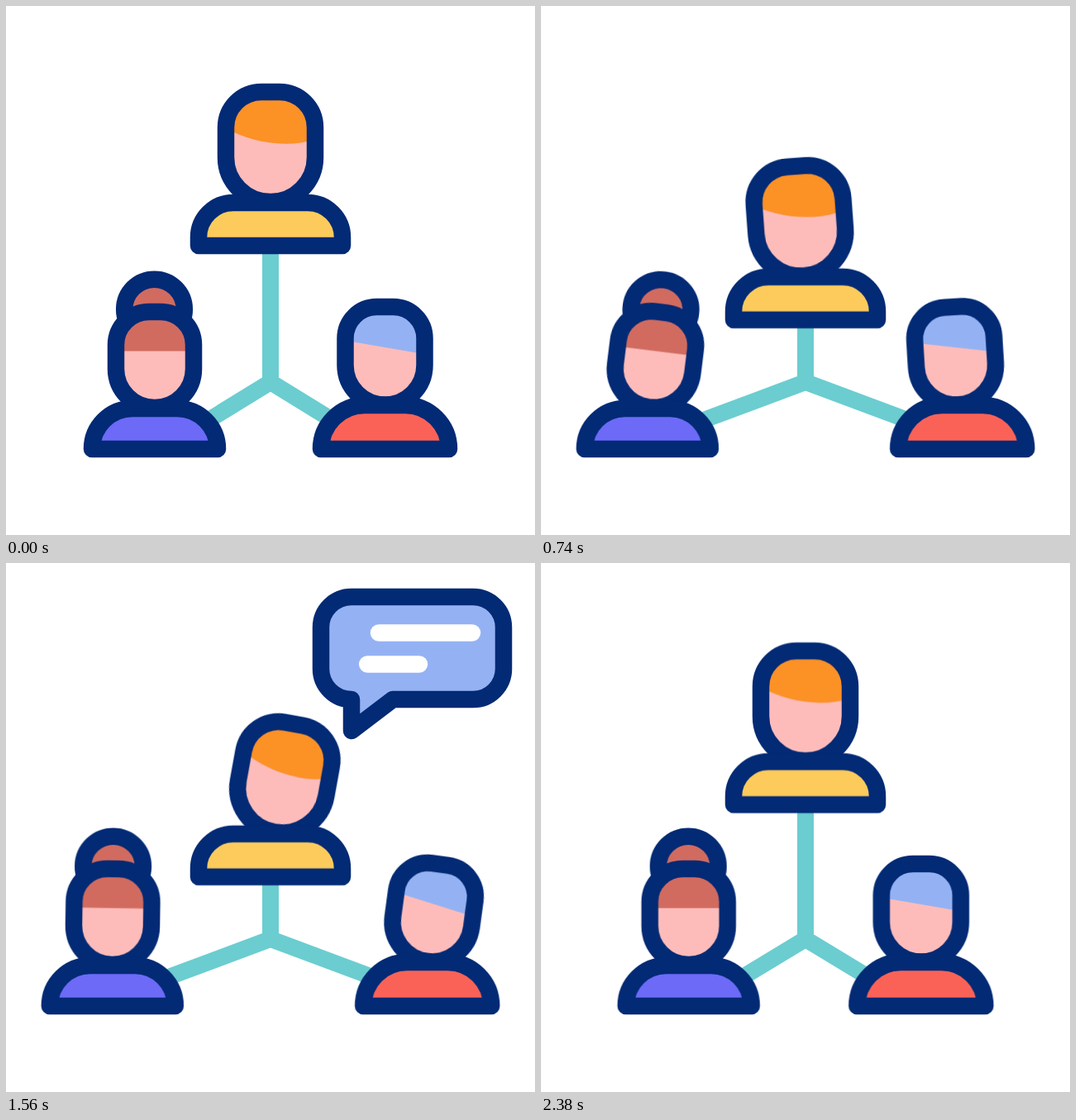
An HTML page that plays this animation: 640 px wide and 640 px high, repeating every 2.4 s.

```html
<!DOCTYPE html>
<html lang="en">
<head>
<meta charset="utf-8">
<title>Team talk</title>
<style>
html, body { margin: 0; height: 100%; overflow: hidden; background: #fff; }
svg { display: block; width: 100vw; height: 100vh; }

.ink { fill: none; stroke: #032a75; stroke-width: 20.5; stroke-linejoin: round; }
.body { stroke: #032a75; stroke-width: 20.5; stroke-linejoin: round; }
.skin { fill: #fdbcba; }

.links, .person, .head, .bubble, .line { animation: 2400ms linear infinite; }

/* Everyone moves apart, then back together */
.person { animation-name: spread; }
@keyframes spread {
  0%, 8.333%, 99.833%, 100% { transform: translate(0, 0); }
  20.417%, 75.833% { transform: translate(var(--x, 0px), var(--y, 0px)); }
}
.links { fill: none; stroke: #6bcdd0; stroke-width: 20; animation-name: stretch; }
@keyframes stretch {
  0%, 8.333%, 99.833%, 100% { d: path("M242 503 L320 455 L398 503 M320 290 L320 455"); }
  20.417%, 75.833% { d: path("M191 503 L320 455 L449 503 M320 380 L320 455"); }
}

/* Heads sway; they are slightly smaller in the middle of the swing */
.head { animation-name: sway; }
@keyframes sway {
  0%, 26.667%, 75.833%, 100% { transform: translateX(0) rotate(0deg) scale(1); }
  38.792% { transform: translateX(var(--x1)) rotate(var(--a1)) scale(1); }
  51% {
    transform: translateX(calc((var(--x1) + var(--x2)) / 2))
      rotate(calc((var(--a1) + var(--a2)) / 2)) scale(var(--mid));
  }
  63.208% { transform: translateX(var(--x2)) rotate(var(--a2)) scale(1); }
}
.top { --y: 89.7px; }
.top .head {
  --x1: -20.4px; --a1: -12deg; --x2: 20.4px; --a2: 12deg; --mid: .981;
  transform-origin: 320px 165px;
}
.right { --x: 51.2px; }
.right .head {
  --x1: -25px; --a1: -10deg; --x2: 9.5px; --a2: 9deg; --mid: .988;
  transform-origin: 458.5px 418px;
}
.left { --x: -51.2px; }
.left .head { animation-name: wiggle; transform-origin: 180px 425px; }
@keyframes wiggle {
  0%, 27.083%, 54.375%, 75.833%, 100% { transform: translateX(0) rotate(0deg) scale(1); }
  34.583% { transform: translateX(19px) rotate(14deg) scale(1); }
  41.458% { transform: translateX(0) rotate(0deg) scale(.972); }
  48.333% { transform: translateX(-19px) rotate(-14deg) scale(1); }
  65% { transform: translateX(.4px) rotate(.9deg) scale(1); }
}

/* Speech bubble slides in, its lines run through, it slides out */
.bubble { animation-name: speak; }
@keyframes speak {
  0%, 41.042%, 82.083%, 100% { transform: translateX(-30px); opacity: 0; }
  47.292%, 75.833% { transform: translateX(0); opacity: 1; }
}
.line {
  stroke: #fff; stroke-width: 20.5; stroke-linecap: round;
  stroke-dasharray: 1 3;
  animation-name: run, show;
  animation-timing-function: linear, step-end;
}
@keyframes run {
  0%, 47.292% { stroke-dashoffset: 1; }
  59.792%, 62.083% { stroke-dashoffset: 0; }
  75.833%, 100% { stroke-dashoffset: -1; }
}
@keyframes show {
  0% { opacity: 0; }
  47.5% { opacity: 1; }
  75.833%, 100% { opacity: 0; }
}
</style>
</head>
<body>
<svg viewBox="0 0 640 640">
  <defs>
    <path id="topHead" d="M266 147a43 43 0 0 1 43-43h22a43 43 0 0 1 43 43v36a54 54 0 0 1-108 0z"/>
    <path id="leftHead" d="M133 410a40 40 0 0 1 40-40h14a40 40 0 0 1 40 40v29a47 47 0 0 1-94 0z"/>
    <path id="rightHead" d="M410.5 402a38 38 0 0 1 38-38h20a38 38 0 0 1 38 38v32.5a48 48 0 0 1-96 0z"/>
  </defs>

  <path class="links" d="M242 503 L320 455 L398 503 M320 290 L320 455"/>

  <g class="person top">
    <g class="head">
      <use href="#topHead" class="skin"/>
      <path fill="#fc9126" d="M266 148C295 164 337 173 374 161.5V147a43 43 0 0 0-43-43h-22a43 43 0 0 0-43 43z"/>
      <use href="#topHead" class="ink"/>
    </g>
    <path class="body" fill="#fccb5b" d="M233 290v-10a42 42 0 0 1 42-42h90a42 42 0 0 1 42 42v10z"/>
  </g>

  <g class="person left">
    <g class="head">
      <circle class="body" fill="#d16b60" cx="179.5" cy="367" r="36.3"/>
      <use href="#leftHead" class="skin"/>
      <path fill="#d16b60" d="M133 417.5V410a40 40 0 0 1 40-40h14a40 40 0 0 1 40 40v7.500z"/>
      <use href="#leftHead" class="ink"/>
    </g>
    <path class="body" fill="#6c6af7" d="M104 536a49 49 0 0 1 49-49h54a49 49 0 0 1 49 49z"/>
  </g>

  <g class="person right">
    <g class="head">
      <use href="#rightHead" class="skin"/>
      <path fill="#94b2f3" d="M410.5 404.700L506.500 421.200V402a38 38 0 0 0-38-38h-20a38 38 0 0 0-38 38z"/>
      <use href="#rightHead" class="ink"/>
    </g>
    <path class="body" fill="#fb6257" d="M381 536a53 53 0 0 1 53-53h49a53 53 0 0 1 53 53z"/>
  </g>

  <g class="bubble">
    <path class="body" fill="#94b2f3" d="M418 41H565a37 37 0 0 1 37 37v50a37 37 0 0 1-37 37H468L418 203V165a37 37 0 0 1-37-37V78a37 37 0 0 1 37-37z"/>
    <path class="line" pathLength="1" d="M420 84.500H564"/>
    <path class="line" pathLength="1" d="M420 122.500H500"/>
  </g>
</svg>
</body>
</html>
```
